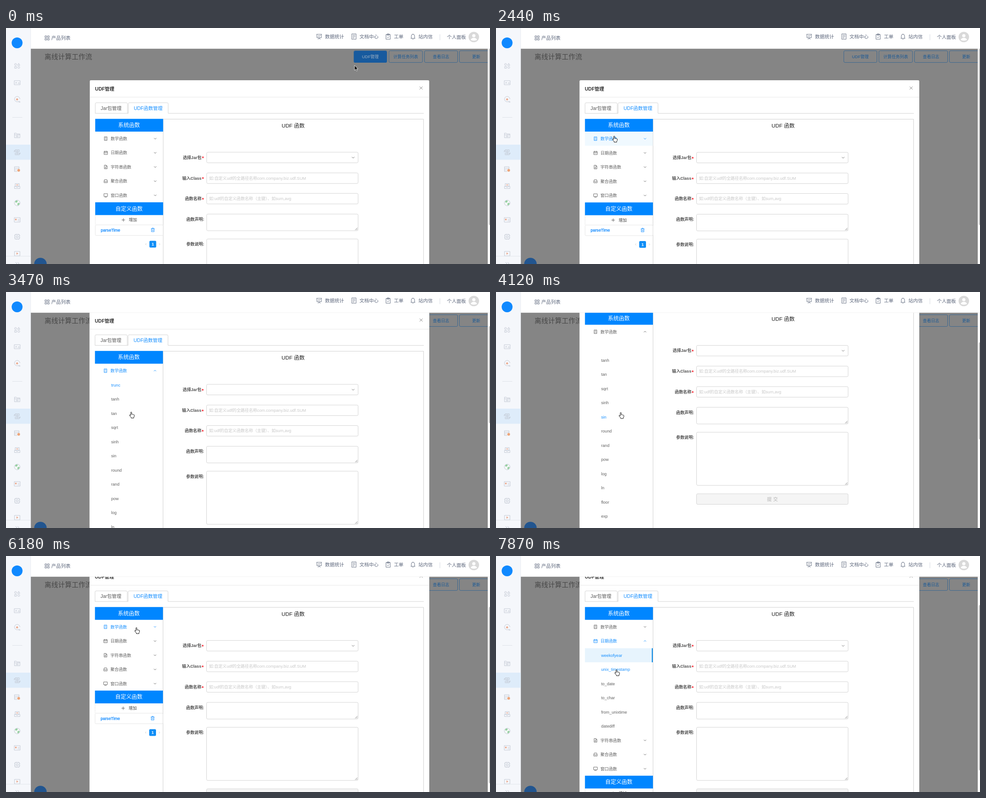
Write an HTML page that moves like this. It is 1068 by 524 pixels and loops after 8 s.

```html
<!DOCTYPE html>
<html lang="zh-CN">
<head>
<meta charset="utf-8">
<title>UDF管理</title>
<style>
  html, body { margin: 0; width: 100%; height: 100%; overflow: hidden; background: #fff; }
  svg { display: block; }
  text { font-family: "Liberation Sans", "Noto Sans CJK SC", "Noto Sans CJK", sans-serif; white-space: pre; }
</style>
</head>
<body>
<svg id="stage" width="1068" height="524" viewBox="0 0 1068 524"></svg>
<script>
const LOOP = 8000, ROW = 31.5;
const BLUE = '#1890ff', INK = '#606060', LINE = '#d4d4d4', SLATE = '#5d677c';

// ---- drawing helpers ----
function el(tag, attrs, parent) {
  const node = document.createElementNS('http://www.w3.org/2000/svg', tag);
  set(node, attrs);
  parent.appendChild(node);
  return node;
}
function set(node, attrs) {
  for (const name in attrs) node.setAttribute(name, attrs[name]);
}
const group = (p, attrs = {}) => el('g', attrs, p);
const rect = (p, x, y, width, height, fill, more) => el('rect', { x, y, width, height, fill, ...more }, p);
const frame = (p, x, y, w, h, stroke, rx = 0, fill = 'none') => rect(p, x, y, w, h, fill, { stroke, rx });
const disc = (p, cx, cy, r, fill, more) => el('circle', { cx, cy, r, fill, ...more }, p);
const line = (p, d, stroke, width = 1, more) =>
  el('path', { d, stroke, 'stroke-width': width, fill: 'none', ...more }, p);
// y is the optical middle of the text
function text(p, x, y, size, fill, str, more) {
  const node = el('text', { x, y: y + size * 0.36, 'font-size': size, fill, ...more }, p);
  node.textContent = str;
  return node;
}
const bold = { 'font-weight': 'bold' };
const middle = { 'text-anchor': 'middle' };

const stage = document.getElementById('stage');

// ---- dimmed page ----
rect(stage, 54, 46, 1014, 478, '#858585');
text(stage, 85, 64, 15, '#474747', '离线计算工作流');
function button(x, w, label) {
  frame(stage, x + 0.5, 50.5, w, 26, '#3c6891', 2.5);
  text(stage, x + w / 2 + 0.5, 63.5, 9.1, '#1b5995', label, middle);
}
button(767, 73, 'UDF管理');
button(844.5, 74, '计算任务列表');
button(923, 73, '查看日志');
button(1000, 74, '更新');
const primary = group(stage);
rect(primary, 768, 51, 72, 26, '#175a9e', { rx: 2.5 });
text(primary, 804, 63.5, 9.1, '#9fb0c2', 'UDF管理', middle);
disc(stage, 76, 524, 13.8, '#22558f');

// ---- dialog ----
const modal = group(stage);
rect(modal, 184.3, 116, 749.7, 1400, '#fff', { rx: 2.5 });
text(modal, 196, 135, 10.5, '#303030', 'UDF管理', bold);
line(modal, 'M912.7 130l6.6 6.6m0-6.6l-6.6 6.6', '#858585');
line(modal, 'M184.3 153.5H934', '#e8e8e8');

line(modal, 'M196 189.5H269.5M357.5 189.5H922', LINE);
line(modal, 'M196.5 189.5V168.5q0-2.5 2.5-2.5H265q2.5 0 2.5 2.5V189.5', LINE);
line(modal, 'M269.5 189.5V168.5q0-2.5 2.5-2.5H355q2.5 0 2.5 2.5V189.5', LINE);
text(modal, 208.5, 178, 10.5, '#5a5a5a', 'Jar包管理');
text(modal, 281.5, 178, 10.5, BLUE, 'UDF函数管理');

line(modal, 'M346.5 1500V202.5H921.5V1500', '#d0d0d0');
text(modal, 633.5, 217, 11.8, '#222', 'UDF 函数', middle);

// ---- form ----
function field(y, h, label, required, hint) {
  frame(modal, 442.5, y, 334.5, h, LINE, 2.6, '#fff');
  text(modal, required ? 431 : 437, y + 11.6, 9.1, '#505050', label, { ...bold, 'text-anchor': 'end' });
  if (required) text(modal, 431.8, y + 13.4, 11.5, '#f5222d', '*', bold);
  if (hint) text(modal, 448, y + 11.6, 9.1, '#c8c8c8', hint);
}
field(276, 23.5, '选择Jar包', true);
field(322, 23.5, '输入Class', true, '如:自定义udf的全路径名称com.company.biz.udf.SUM');
field(367.5, 23.5, '函数名称', true, '如:udf的自定义函数名称（主键）、如sum,avg');
field(413.5, 37, '函数声明:');
field(468.8, 118, '参数说明:');
line(modal, 'M763.2 286.4l2.8 2.8l2.8-2.8', '#777');
for (const y of [449, 585.5]) line(modal, `M770.5 ${y}l5-5m-2 5l2-2`, '#777', 0.9);
frame(modal, 442.5, 605.5, 334.5, 23.5, LINE, 2.6, '#f5f5f5');
text(modal, 610, 617.5, 10.5, '#b4b4b4', '提 交', middle);

// ---- function menu ----
const banner = (p, y, label) => {
  rect(p, 196.3, y, 150, 28.4, '#0086ff');
  text(p, 271, y + 14.3, 12, '#fff', label, middle);
};
banner(modal, 201.8, '系统函数');

const MATH = 'trunc tanh tan sqrt sinh sin round rand pow log ln floor exp cosh cos conv ceil atan asin acos abs'.split(' ');
const DATE = 'weekofyear unix_timestamp to_date to_char from_unixtime datediff'.split(' ');
const sections = [
  ['数学函数', 'M216.5-4h6v8h-6zM218-2h3M218 .5h1m1 0h1M218 2.3h1m1 0h1', MATH],
  ['日期函数', 'M215.8-3h7.6v6.8h-7.6zM215.8-.8h7.6M217.6-4.3v2M221.6-4.3v2M217.5 1.3h1m1.5 0h1', DATE],
  ['字符串函数', 'M216.5-4h4l2.2 2.2v5.9h-6.2zM220.3-4v2.4h2.4M218 .3h3M218 2.2h3', []],
  ['聚合函数', 'M216.8-3.3h5.4l1 3.3v3.5h-7.4v-3.5zM215.8.2h2.2l.6 1h2l.6-1h2', []],
  ['窗口函数', 'M215.5-3.6h8v6h-8zM217 4h5', []],
].map(([label, icon, names]) => {
  const g = group(modal);
  const flash = rect(g, 196.3, 0, 150, ROW, '#f0f9ff');
  const head = group(g, { transform: `translate(0 ${ROW / 2})` });
  const mark = line(head, icon, INK, 0.9);
  const caption = text(head, 230.5, 0, 9.1, INK, label);
  const chevron = line(head, '', INK, 0.9);
  const box = el('svg', { x: 196, y: ROW, width: 150.3, height: 0 }, g);
  const items = names.map((name, i) => {
    const y = i * ROW;
    const chosen = group(box);
    rect(chosen, 0.3, y, 150, ROW, '#e7f4fd');
    rect(chosen, 147.8, y, 2.2, ROW, '#108ee9');
    return { name, chosen, label: text(box, 36, y + ROW / 2, 9.1, INK, name) };
  });
  return { g, flash, mark, caption, chevron, box, items };
});

const custom = group(modal);
line(custom, 'M196.5 29V50M346.2 29V50', '#dcdcdc', 1, { 'stroke-dasharray': '2 1.5' });
banner(custom, -0.2, '自定义函数');
line(custom, 'M254.8 39h7.4m-3.7-3.7v7.4', '#555', 0.9);
text(custom, 270.5, 39, 9.1, '#444', '增加');
frame(custom, 196.5, 50, 149.7, 23.5, '#e6e6e6', 2, '#fff');
text(custom, 208.7, 61.5, 9.1, '#1089ff', 'parseTime', { stroke: '#1089ff', 'stroke-width': 0.3 });
line(custom, 'M319.5 58.5h8M322 58.5v-1.5h3v1.5M320.5 58.5v6.7h6v-6.7M322.5 60.5v3m2 0v-3', BLUE, 0.9);
line(custom, 'M309.3 91l-1.8 2l1.8 2M337.5 91l1.8 2l-1.8 2', '#c8c8c8', 0.9);
rect(custom, 316, 85.5, 15, 15, '#108ef6', { rx: 2.5 });
text(custom, 323.5, 93, 9.1, '#fff', '1', { ...middle, ...bold });

// ---- scrollbar ----
rect(stage, 1063, 46, 5, 478, '#fafafa');
const thumb = rect(stage, 1065.6, 46, 5, 100, '#c1c1c1', { rx: 2.4 });

// ---- top bar ----
rect(stage, 54, 0, 1014, 46, '#fff');
line(stage, 'M54 45.7H1068', '#ececec', 0.7);
line(stage, 'M86 17.5h3.6v3.6h-3.6zM91.7 17.5h3.6v3.6h-3.6zM86 23.2h3.6v3.6h-3.6zM91.7 23.2h3.6v3.6h-3.6z', SLATE, 0.9);
text(stage, 100, 22, 10.6, SLATE, '产品列表');
[
  ['数据统计', 704, 'M685 14h12M686 14v7.5h10V14M688 19l2-2l2 1.5l2-2.5M691 21.5v2M688 25l3-2l3 2'],
  ['文档中心', 780, 'M763 13h9.5v12h-9.5zM765 16h5.5M765 19h5.5M765 22h3.5'],
  ['工单', 856, 'M838.5 14.5h9.5v10.5h-9.5zM841 13v3h4.5v-3zM841 20l1.8 1.8l3.2-3.3'],
  ['站内信', 910, 'M893 23h10M894.3 23v-5q0-4 3.7-4t3.7 4v5M898 14v-1.4M896.8 24.8h2.4'],
].forEach(([label, x, icon]) => {
  line(stage, icon, SLATE, 0.9);
  text(stage, x, 19, 10.5, SLATE, label);
});
line(stage, 'M957.5 14V27', '#d8dbe2');
text(stage, 973, 20, 10.5, SLATE, '个人面板');
disc(stage, 1032.3, 20, 11.6, '#d9d9d9');
disc(stage, 1032.3, 17, 3.6, '#fff');
el('path', { d: 'M1025.3 26.5q1.5-4.7 7-4.7t7 4.7q-7 3.5-14 0z', fill: '#fff' }, stage);

// ---- side bar ----
rect(stage, 0, 0, 54.5, 524, '#f5f7fb');
line(stage, 'M54.5 0V524', '#e6e9ee', 0.8);
disc(stage, 24.5, 33, 12, '#1089ff');
rect(stage, 0, 259, 54.5, 33.5, '#deecfa');
const PALE = '#bfc5d0', WARM = '#eba98e';
[
  [84, 'M-5.8-3a2.2 2.2 0 1 0 4.4 0a2.2 2.2 0 1 0-4.4 0M3.3-5.6l2.7 4.4h-5.4zM-5.6 1.4h4v4h-4zM1.2 3.4a2.2 2.2 0 1 0 4.4 0a2.2 2.2 0 1 0-4.4 0'],
  [121.5, 'M-6.5-4.5h13v9h-13zM-4 2l1.7-3.5l1.7 3.5M2 0h3M2 2h3'],
  [159, 'M6-1.2a6 6 0 1 0-3 5.3h3.5M3 5.7h4'],
  [238.5, 'M-6-5h4l1.2 1.7h6.8v8.5h-12zM-6-1.5h12M-3 .8h6M-3 3h6'],
  [276, 'M-4.5-5.5h9v4h-9zM-4.5 1.5h9v4h-9zM-4.5-3.5h-2v3M4.5 3.5h2v-3M0-1.5v3M-2-3.5h4M-2 3.5h4'],
  [313.5, 'M-6-5.5h10v3.4h-10zM-6-2.1v3.6h6M-6 1.5v3.6h6M4-2v2'],
  [351, 'M-4.5-5.5h9v6h-9zM-6 .5v5h12v-5h-3l-1 2h-4l-1-2z'],
  [426, 'M-6.5-5h13v10h-13zM1-1h4M1 2h4'],
  [463.5, 'M-5-5h10v10h-10zM-2-2h4v4h-4zM-2-6.5v1.5M2-6.5v1.5M-2 5v1.5M2 5v1.5M-6.5-2h1.5M-6.5 2h1.5M5-2h1.5M5 2h1.5'],
  [501, 'M-6-5h12v10h-12z'],
].forEach(([y, d]) => line(stage, d, PALE, 0.9, { transform: `translate(24.7 ${y})` }));
disc(stage, 24.5, 158.5, 2.2, WARM);
disc(stage, 28, 316, 3, '#eda57a');
line(stage, 'M22.5 348.5h4.5', WARM, 1.6);
rect(stage, 20, 423.5, 3.4, 3.4, WARM);
el('path', { d: 'M23.2 498.3l4 2.5l-4 2.5z', fill: WARM }, stage);
disc(stage, 24.7, 388.5, 6.3, '#f4f8f7', { stroke: PALE, 'stroke-width': 0.9 });
el('path', { d: 'M20 385q3-3.5 6-1l-1.5 3l-3 1zM25 391q1-4 5-2q-.5 4-4 5z', fill: '#95d0a0' }, stage);
line(stage, 'M14 198.5H36', '#dfe2e8');
rect(stage, 0, 507, 54, 17, '#f5f7fb');
line(stage, 'M0 506.8H54', '#e2e6ec');
line(stage, 'M21 520l3 3l-3 3M25.5 520l3 3l-3 3', PALE);

// ---- pointer ----
const pointer = group(stage);
const arrow = el('path', {
  d: 'M0 0v11l2.6-2.4l1.9 4l1.8-.8l-1.9-3.9h3.6z',
  fill: '#111', stroke: '#fff', 'stroke-width': 0.8
}, pointer);
const hand = el('path', {
  d: 'M-.3 6.6V.1a1.1 1.1 0 0 1 2.2 0v4q1.2-.7 2 .3q1.3-.6 2 .4q1.6-.3 1.7 1.2v2.4l-1.2 2.2v1.8h-5.8v-1.5l-3.4-4q-.8-1.3.3-1.6q.9-.2 2.2 1.3z',
  fill: '#fff', stroke: '#111', 'stroke-width': 1, 'stroke-linejoin': 'round'
}, pointer);

// ---- timing ----
// the picture moves in bursts: start, end, number of steps
const BURSTS = [
  [150, 530, 3], [820, 970, 2], [1270, 2150, 7], [2440, 3470, 8],
  [3610, 4120, 4], [4720, 5580, 6], [5880, 6800, 7], [6950, 7870, 7],
];
function snap(t) {
  let at = 0;
  for (const [a, b, n] of BURSTS) {
    if (t < a) break;
    const k = Math.min(n - 1, Math.floor((t - a) / (b - a) * (n - 1) + 0.1));
    at = a + (b - a) * k / (n - 1);
  }
  return at;
}
// eased value on a track of [time, value] points
function along(track, t) {
  if (t <= track[0][0]) return track[0][1];
  for (let i = 1; i < track.length; i++) {
    const [t1, v1] = track[i], [t0, v0] = track[i - 1];
    if (t <= t1) {
      const u = (t - t0) / (t1 - t0);
      return v0 + (v1 - v0) * u * u * (3 - 2 * u);
    }
  }
  return track[track.length - 1][1];
}
const within = (t, a, b) => t >= a && t < b;

const X = [[0, 769], [530, 553], [700, 553], [970, 546], [1100, 546], [2150, 260], [2600, 260], [3180, 275.5],
  [3540, 275.5], [4120, 274.5], [4640, 274.5], [4892, 273.5], [5580, 287], [6250, 287], [6800, 284], [7050, 284], [7870, 265]];
const Y = [[0, 83], [530, 144], [700, 144], [970, 112.5], [1100, 112.5], [2150, 241], [2600, 241], [3180, 267.5],
  [3540, 267.5], [4120, 268.5], [4892, 268.5], [5580, 160], [6250, 160], [6800, 186], [7050, 186], [7420, 218], [7560, 220], [7870, 253.5]];
const SCROLL = [[2900, 0], [3470, 71], [3540, 71], [4120, 157.5], [4640, 157.5], [4892, 91.5], [5240, 88.5]];
const OPEN = [
  [[2440, 0], [2800, 1], [5780, 1], [6150, 0]],
  [[6900, 0], [7260, 1]],
];
const TURN = [
  [[2440, 0], [2880, 1], [5780, 1], [6340, 0]],
  [[6900, 0], [7300, 1]],
];
const FOCUS = [[0, 1], [150, 0.6], [340, 0]];

const lit = {
  trunc: [3250, 3610], sin: [3900, 5900], weekofyear: [7300, LOOP], unix_timestamp: [7800, LOOP],
};

function draw(time) {
  const t = snap(time);
  const scroll = along(SCROLL, t);
  const zoom = t < 150 ? 'translate(769 83) scale(.999) translate(-769 -83)' : '';
  set(modal, { transform: `translate(0 ${-scroll}) ${zoom}` });
  set(primary, { opacity: along(FOCUS, t) });

  const active = [within(t, 2000, 3600) || within(t, 5400, 6500), t >= 6500];
  const pressed = [within(t, 2440, 2700), within(t, 6950, 7150)];
  let y = 230, extra = 0;
  sections.forEach((s, i) => {
    const open = OPEN[i] ? along(OPEN[i], t) : 0;
    const d = 1.3 * (1 - 2 * (TURN[i] ? along(TURN[i], t) : 0));
    const color = active[i] ? BLUE : INK;
    const rows = open * s.items.length;
    set(s.g, { transform: `translate(0 ${y})` });
    set(s.flash, { opacity: pressed[i] ? 1 : 0 });
    set(s.mark, { stroke: color });
    set(s.caption, { fill: color });
    set(s.chevron, { stroke: color, d: `M326.3 ${-d}L328.8 ${d}L331.3 ${-d}` });
    set(s.box, { height: rows * ROW });
    for (const item of s.items) {
      const span = lit[item.name];
      set(item.label, {
        fill: span && within(t, ...span) ? BLUE : INK,
        opacity: item.name === 'trunc' && t >= 3610 ? 0 : 1,
      });
      set(item.chosen, { opacity: item.name === 'weekofyear' && t >= 7500 ? 1 : 0 });
    }
    extra += rows;
    y += ROW * (1 + rows);
  });
  set(custom, { transform: `translate(0 ${y})` });

  const total = Math.max(631, 673 + (extra - 6) * ROW);
  set(thumb, { y: 46 + scroll * 478 / total, height: 478 * 517 / total });

  const pointing = t >= 2000;
  set(pointer, { transform: `translate(${along(X, t)} ${along(Y, t)})` });
  set(arrow, { opacity: pointing ? 0 : 1 });
  set(hand, { opacity: pointing ? 1 : 0 });
}

const start = performance.now();
function tick() {
  draw((performance.now() - start) % LOOP);
  requestAnimationFrame(tick);
}
draw(0);
requestAnimationFrame(tick);
</script>
</body>
</html>
```
